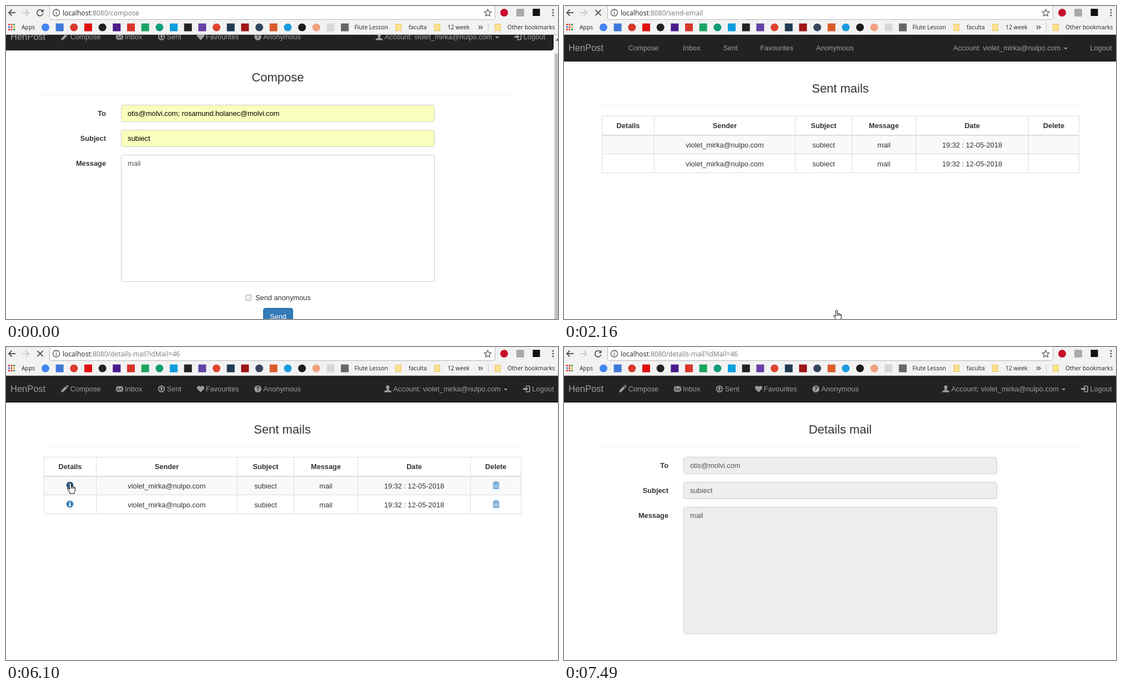
Recreate the animation shown at these times as an HTML page. Size 994x564 px, loop 9130 ms.

```html
<!DOCTYPE html>
<html lang="en">
<head>
<meta charset="utf-8">
<title>Mail client</title>
<style>
  html, body { margin: 0; width: 100%; height: 100%; overflow: hidden; background: #fff; }
  svg { display: block; font: 12.81px "Liberation Sans", Arial, sans-serif; fill: #333; }
  .bar { font: 10.4px "Open Sans", "Noto Sans", sans-serif; fill: #222; }
  .url { font-size: 12.1px; }
  .nav { fill: #9d9d9d; }
  .brand { font-size: 16.47px; }
  .title { font-size: 21.96px; }
  .mid { text-anchor: middle; }
  .end { text-anchor: end; }
  .bold { font-weight: bold; }
  .line { fill: none; stroke-width: 1.8; }
</style>
</head>
<body>
<svg width="994" height="564" viewBox="0 0 994 564">
  <defs>
    <path id="pencil" d="M-6.5 6.5l1.2-4.3L1.6-4.7l3.1 3.1-6.9 6.9zM2.6-5.7l1-1q.7-.6 1.4 0L6.7-5q.6.7 0 1.4l-1 1z"/>
    <path id="mail" d="M-6.5-4.8h13L0 .9zM-6.5-3.4l4.1 3.7-4.1 3.7zM6.5-3.4L2.4.3l4.1 3.7zM-6.3 5l4.6-4L0 2.4 1.7 1l4.6 4z"/>
    <g id="up"><circle class="line" r="5.3" stroke="#9d9d9d"/><path d="M0-4l3.3 3.6H1.2v3.8h-2.4V-.4h-2.1z"/></g>
    <path id="heart" d="M0 6.2L-5.3.6C-8-2.2-5.8-5.6-3.2-5.6-1.6-5.6-.6-4.7 0-3.6.6-4.7 1.6-5.6 3.2-5.6 5.8-5.6 8-2.2 5.3.6z"/>
    <g id="help"><circle r="6.3"/><text class="mid bold" y="3.8" font-size="10.5" fill="#222">?</text></g>
    <path id="user" d="M0-6.4c2 0 3 1.4 3 3.3C3-1.5 2.3-.3 1.6.5v1.2l4 1.8q1 .5 1 2.5H-6.6q0-2 1-2.5l4-1.8V.5C-2.3-.3-3-1.5-3-3.1c0-1.9 1-3.3 3-3.3z"/>
    <g id="leave"><path d="M-6.5-1.5h4.5v-2.8L2.7 0-2 4.3V1.5h-4.5z"/><path class="line" stroke="#9d9d9d" d="M-1.5-5.2h5q2 0 2 2v6.4q0 2-2 2h-5"/></g>
    <g id="info"><circle r="6.3"/><path fill="#fff" d="M-1.2-4.3h2.4v1.9h-2.4zM-2-1.4h3.2v4h1v1.3h-4.3V2.6h1V-.1H-2z"/></g>
    <path id="trash" fill="none" stroke="#337ab7" stroke-width="1.1" d="M-6-4.5H6M-2-4.5v-2h4v2M-4.8-2.5v8.7h9.6v-8.7zM-2.4-2v8M0-2v8M2.4-2v8"/>
    <path id="arrow" stroke="#fff" stroke-width=".7" fill="#000" d="M0 0V12.8L2.9 10.2 5 15 7.1 14.1 5.1 9.5H9z"/>
    <path id="beam" fill="none" stroke="#000" d="M-3.5-7.5h2.5l1 1 1-1h2.5M0-6.5v13M-3.5 7.5h2.5l1-1 1 1h2.5"/>
    <path id="hand" fill="#fff" stroke="#000" stroke-linejoin="round" d="M-1.5 1Q0-1 1.5 1V6.5Q3 5.5 4 7 5.7 6.2 6.5 7.7 8.7 7.4 8.7 9.5V13L7 16.5V19H-1V17L-5.3 11Q-5.3 9-3.5 9.5L-1.5 11.5zM1.5 6.5v3.5M4 7v3.5M6.5 7.7v3"/>
  </defs>
  <g id="view"></g>
</svg>
<script>
const LOOP = 9130;
const ACCOUNT = 'violet_mirka@nulpo.com', FRIEND = 'otis@molvi.com';
const view = document.getElementById('view');

const text = (x, y, s, cls = '', fill) =>
  `<text x="${x}" y="${y}" class="${cls}"${fill ? ` fill="${fill}"` : ''}>${s}</text>`;
const rect = (x, y, w, h, fill, stroke = 'none', r = 0) =>
  `<rect x="${x}" y="${y}" width="${w}" height="${h}" rx="${r}" fill="${fill}" stroke="${stroke}"/>`;
const path = (d, stroke, width = 1) => `<path d="${d}" fill="none" stroke="${stroke}" stroke-width="${width}"/>`;
const shape = (d, fill) => `<path d="${d}" fill="${fill}"/>`;
const dot = (x, y, r, fill) => `<circle cx="${x}" cy="${y}" r="${r}" fill="${fill}"/>`;
const icon = (id, x, y, fill = '') => `<use href="#${id}" x="${x}" y="${y}"${fill && ` fill="${fill}"`}/>`;
const shift = (x, y, s) => `<g transform="translate(${x} ${y})">${s}</g>`;

// Bookmark tiles: o is round, s is square
const TILES = ('o4285f4 s3f78d8 od93a2b se01010 o222222 s4a1a8c sd8352a s1da462 o0f9d78 s0a9ee0 s222222 ' +
  's6441a5 oe0442e s1f3a52 sa01515 o36465d sd95b2b o1a9be0 o1b1b1b of0a080 sd8d8d8 s666666').split(' ');
const APP_DOTS = ['#e0483e', '#e0483e', '#3b9a4c', '#3f7de0', '#e0483e', '#e8b62c'];

const folder = x => rect(x + .5, 32.5, 10, 12, '#fbe08f', '#e8c765');

function toolbar(url, loading) {
  let s = rect(0, 0, 994, 52, '#f2f2f2') + path('M0 51.5h994', '#b8b8b8');
  s += rect(78.5, -4, 802, 28.5, '#fff', '#b8b8b8', 3);
  s += path('M17 12H5M10.5 6.5L5 12l5.5 5.5', '#555', 1.8);
  s += path('M29 12h12M35.5 6.5L41 12l-5.5 5.5', '#ccc', 1.8);
  s += loading
    ? path('M56.5 7l10 10M66.5 7l-10 10', '#555', 1.8)
    : path('M66 9A5.6 5.6 0 1 0 66.8 13.5', '#555', 1.8) + shape('M67.8 5.5v5.5h-5.5z', '#555');
  s += path('M84.5 12a6 6 0 1 0 12 0a6 6 0 1 0-12 0M90.5 11v4.5M90.5 8v1.5', '#555', 1.3);
  s += text(102, 16.5, `localhost<tspan fill="#777">:8080/${url}</tspan>`, 'url');
  s += path('M867.5 6l1.8 4.1 4.5.5-3.4 3 1 4.4-3.9-2.3-3.9 2.3 1-4.4-3.4-3 4.5-.5z', '#555', 1.2);
  s += dot(897, 12, 7, '#c70d2c') + rect(919, 5, 14, 14, '#aaa', 'none', 2) + rect(948.5, 5, 13, 13, '#111');
  for (const y of [7, 12, 17]) s += dot(985, y, 1.5, '#555');
  for (let i = 0; i < 9; i++)
    s += rect(4 + i % 3 * 4.5, 32 + Math.floor(i / 3) * 4.5, 3, 3, APP_DOTS[i % 6]);
  TILES.forEach((tile, i) => {
    const x = 71 + i * 25.67, fill = '#' + tile.slice(1);
    s += tile[0] == 'o' ? dot(x, 38.5, 7, fill) : rect(x - 7, 31.5, 14, 14, fill);
  });
  s += text(28, 42.3, 'Apps') + text(627.5, 42.3, 'Flute Lesson') + text(725, 42.3, 'faculta') + text(795, 42.3, '12 week');
  s += [701, 771, 880].map(folder).join('') + text(903, 42.3, 'Other bookmarks');
  s += path('M851 35.5l3 3-3 3M855 35.5l3 3-3 3', '#444', 1.2) + path('M868.5 31v15', '#ccc');
  return `<g class="bar">${s}</g>`;
}

function navbar(icons, compose) {
  const right = compose ? -15.5 : 0, pick = (a, b) => icons ? a : b;
  const link = (x, s) => text(x, 80, s);
  let left = text(8, 81, 'HenPost', 'brand') + link(115.7, 'Compose') + link(214, 'Inbox') +
    link(pick(289.5, 286.5), 'Sent') + link(pick(359.7, 353.3), 'Favourites') + link(pick(463.3, 454), 'Anonymous');
  const x = pick(697.3, 700.8);
  let side = link(x, 'Account: ' + ACCOUNT) + shape(`M${x + 199} 75h7l-3.5 3.5z`, '#9d9d9d') + link(947.3, 'Logout');
  if (icons) {
    left += icon('pencil', 105.5, 75.5) + icon('mail', 204.5, 75.5) + icon('up', 280, 75.5) +
      icon('heart', 350.5, 75.5) + icon('help', 453.5, 75.5);
    side += icon('user', 687.5, 75.5) + icon('leave', 937.5, 75.5);
  }
  const bar = rect(-4.5, 51.5, compose ? 990 : 1010, 48, '#222', '#080808', 4);
  return `<g class="nav">${shift(0, compose ? -20 : 0, bar + left + shift(right, 0, side))}</g>`;
}

const heading = s => text(497.5, 156, s, 'title mid') + path('M68 179.5H928', '#eee');

function fields(title, to, fill, noteFill, ink) {
  const rows = [['To', to, 198.5, 30, fill, ink], ['Subject', 'subiect', 243.5, 30, fill, ink],
    ['Message', 'mail', 288.5, 228, noteFill, '#555']];
  return heading(title) + rows.map(([label, value, y, h, bg, color]) =>
    text(188, y + 19.5, label, 'bold end') + rect(215.5, y, 564, h, bg, '#ccc', 3.7) +
    text(227, y + 19.5, value, '', color)).join('');
}

function composePage(hover) {
  return shift(-8, -20, fields('Compose', `${FRIEND}; rosamund.holanec@molvi.com`, '#faffbd', '#fff', '#000')) +
    rect(431.5, 520.5, 10, 10, '#eee', '#aaa', 1.5) + text(449, 530, 'Send anonymous') +
    rect(463.5, 544.5, 53, 31, hover ? '#286090' : '#337ab7', hover ? '#204d74' : '#2e6da4', 3.7) +
    text(490, 564, 'Send', 'mid', '#fff') +
    rect(986, 52, 8, 512, '#f1f1f1') + rect(988, 86, 6, 478, '#c1c1c1') +
    shape('M989.5 62.5l4.5-4.5v4.5z', '#505050');
}

function sentPage(icons, hover) {
  const edges = [68.5, 162.5, 416.5, 518.5, 633.5, 836.5, 927.5];
  const row = (cells, y, cls) => cells.map((s, i) => text((edges[i] + edges[i + 1]) / 2, y, s, 'mid ' + cls)).join('');
  let s = heading('Sent mails') + rect(68, 233, 860, 33, '#f9f9f9');
  s += path(edges.map(x => `M${x} 198v103`).join('') + 'M68 198.5h860M68 266.5h860M68 300.5h860', '#ddd');
  s += path('M68 233h860', '#ddd', 2);
  s += row(['Details', 'Sender', 'Subject', 'Message', 'Date', 'Delete'], 220, 'bold');
  for (const y of [249, 283]) {
    s += row(['', ACCOUNT, 'subiect', 'mail', '19:32 : 12-05-2018', ''], y + 5.5, '');
    if (icons) s += icon('info', 115, y, hover && y == 249 ? '#23527c' : '#337ab7') + icon('trash', 882.5, y);
  }
  return s;
}

// Pointer moves: start, end, steps, target x, target y, upward bend
const MOVES = [
  [360, 1200, 12, 491, 545, 70], [1300, 1370, 2, 491, 548, 0],
  [3630, 4090, 7, 91, 289, 0], [4320, 4560, 4, 101.5, 256, 0], [4780, 4780, 1, 106, 254, 0],
  [4930, 5110, 3, 116, 245, 0], [6500, 6960, 7, 692, 422, 0], [7190, 7490, 5, 905, 575, 0]
];
const ease = p => p * p * p * (10 - 15 * p + 6 * p * p);

function pointer(t) {
  let x = 846, y = 570;
  for (const [start, end, steps, tx, ty, bend] of MOVES) {
    if (t < start) break;
    const k = t >= end ? steps : 1 + Math.floor((t - start) / (end - start) * (steps - 1));
    const p = ease(k / steps);
    x += (tx - x) * p;
    y += (ty - y) * p - 4 * bend * p * (1 - p);
  }
  const hand = t < 3630 ? x < 517 && y > 543 : t < 6500 && x > 108 && y < 254;
  const beam = t >= 6500 && x > 215 && x < 780 && y > 288 && y < 517;
  return { x, y, hand, id: hand ? 'hand' : beam ? 'beam' : 'arrow' };
}

function scene(t) {
  const within = (a, b) => t >= a && t < b;
  const compose = t < 2160;
  const icons = !within(2160, 2460) && !within(6190, 6260);
  const loading = within(1840, 2460) || within(5490, 6260);
  const url = t < 1990 ? 'compose' : t < 5790 ? 'send-email' : 'details-mail?idMail=46';
  const p = pointer(t);
  const page = compose ? composePage(p.hand)
    : t < 6190 ? sentPage(icons, t >= 3630 && p.hand)
    : fields('Details mail', FRIEND, '#eee', '#eee', '#555');
  return page + navbar(icons, compose) + toolbar(url, loading) + icon(p.id, p.x, p.y);
}

let shown = '';
function tick() {
  const next = scene(performance.now() % LOOP);
  if (next != shown) view.innerHTML = shown = next;
  requestAnimationFrame(tick);
}
tick();
</script>
</body>
</html>
```
